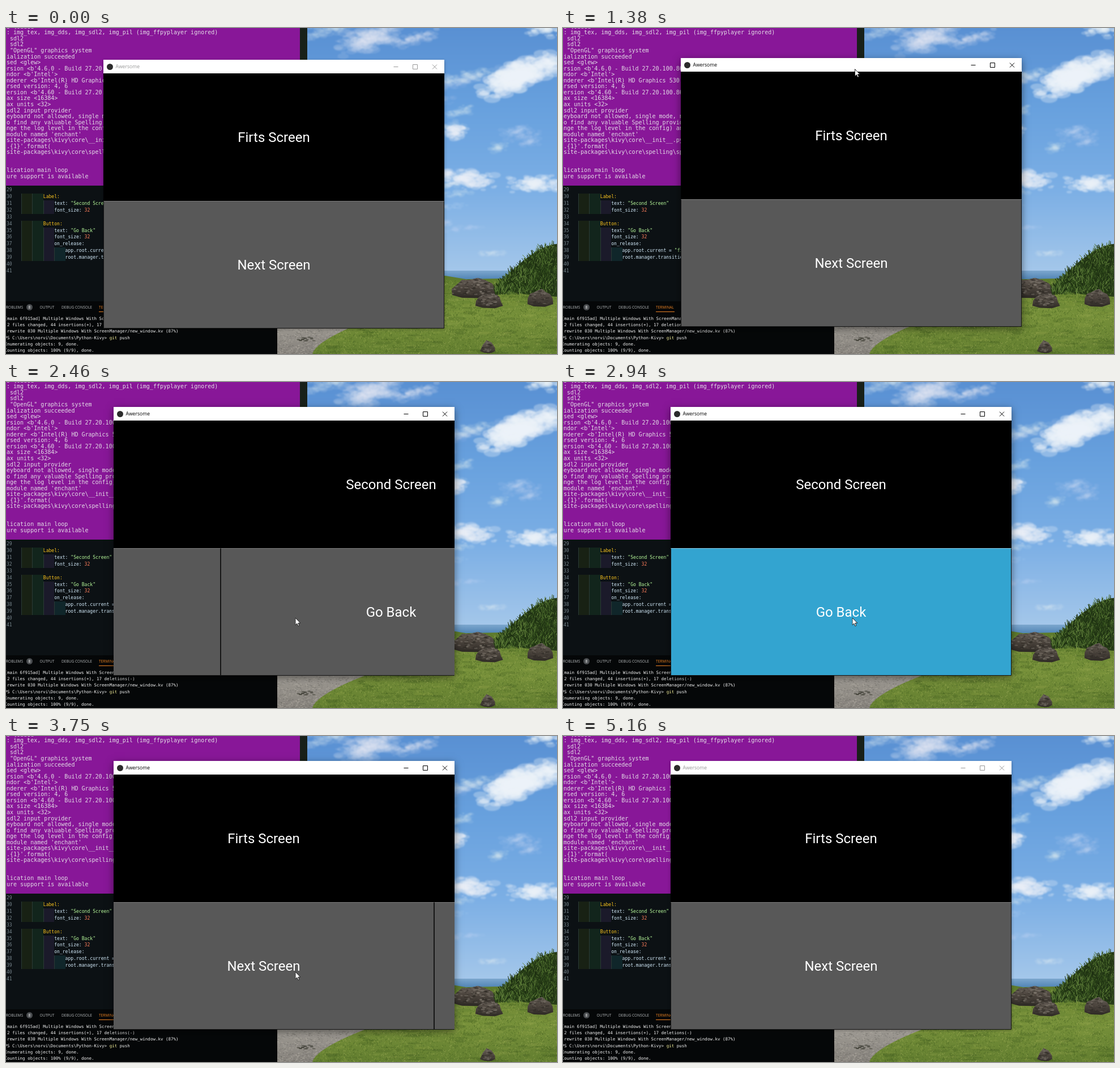
An HTML page with a canvas that plays this animation: 973 px wide and 575 px high, repeating every 5.25 s.

```html
<!DOCTYPE html>
<html lang="en">
<head>
<meta charset="utf-8">
<title>Two screens</title>
<style>
html, body { margin: 0; width: 100%; height: 100%; overflow: hidden; background: #0c1013; }
#stage { position: absolute; left: 0; top: 0; width: 973px; height: 575px; overflow: hidden; }
#stage div, canvas, svg { position: absolute; left: 0; top: 0; }
#stage .row { height: 12px; white-space: pre; }
.log { font: 10px/12px "DejaVu Sans Mono", monospace; color: #e3dde6; }
.code { font: 8.07px/12px "DejaVu Sans Mono", monospace; color: #d3ebfa; }
.shell { font: 7.5px/12px "DejaVu Sans Mono", monospace; color: #f2f2f2; }
.tab { font: 6.6px/12px "Open Sans", sans-serif; color: #b4b8ba; }
#win { width: 602px; height: 473px; background: #000; }
#stage #bar { top: -1px; width: 602px; height: 24px; background: #fff; }
#stage #icon { left: 6px; top: 6.5px; width: 11px; height: 11px; border-radius: 50%; background: #2b2b2b; }
#stage #title { left: 21.5px; top: 1px; font: 8.6px/23px "Open Sans", sans-serif; }
#stage #tools { top: 1px; fill: none; stroke: currentColor; }
#stage #view { top: 23px; width: 602px; height: 450px; overflow: hidden; background: #000; }
.screen { width: 602px; height: 450px; font: 24px "Roboto", sans-serif; color: #fff; text-align: center; }
.label { width: 602px; height: 225px; line-height: 226px; }
#stage .button { top: 225px; width: 600px; height: 223px; line-height: 225px;
  background: #585858; border: 1px solid #161616; border-top-color: #7b7b7b; }
#stage .button.down { background: #33a4d0; border-top-color: #86c9e2; }
</style>
</head>
<body>
<div id="stage">
  <canvas id="photo" width="973" height="575"></canvas>
  <div id="desk"></div>
  <div id="win">
    <div id="bar">
      <div id="icon"></div>
      <div id="title">Awersome</div>
      <svg id="tools" width="602" height="23">
        <path d="M512.5 11.5h8M546.5 7.5h8v8h-8zM581 7.5l8 8m0-8l-8 8"/>
      </svg>
    </div>
    <div id="view">
      <div class="screen" id="first"><div class="label">Firts Screen</div><div class="button">Next Screen</div></div>
      <div class="screen" id="second"><div class="label">Second Screen</div><div class="button">Go Back</div></div>
    </div>
  </div>
  <svg id="cursor" width="14" height="20">
    <path d="M.5.5v12.6l2.9-2.7 2 4.6 2-.9-2-4.4h3.9z" fill="#fff" stroke="#111" stroke-width=".9"/>
  </svg>
</div>
<script>
const $ = id => document.getElementById(id);
const desk = $('desk');

// ---------- wallpaper ----------
const photo = $('photo'), g = photo.getContext('2d');
let seed = 7;
function rnd() {
  seed = (seed + 0x6D2B79F5) | 0;
  let v = Math.imul(seed ^ (seed >>> 15), 1 | seed);
  v = (v + Math.imul(v ^ (v >>> 7), 61 | v)) ^ v;
  return ((v ^ (v >>> 14)) >>> 0) / 4294967296;
}
const range = (a, b) => a + (b - a) * rnd();
const spread = () => rnd() + rnd() - 1;
const pick = list => list[Math.floor(rnd() * list.length)];
const repeat = (n, fn) => { for (let i = 0; i < n; i++) fn(i); };

function ramp(y0, y1, ...colors) {
  const r = g.createLinearGradient(0, y0, 0, y1);
  colors.forEach((c, i) => r.addColorStop(i / (colors.length - 1), c));
  return r;
}
function poly(fill, points) {
  g.fillStyle = fill;
  g.beginPath();
  points.forEach(([x, y]) => g.lineTo(x, y));
  g.fill();
}
function blob(x, y, rx, ry, fill) {
  g.fillStyle = fill;
  g.beginPath();
  g.ellipse(x, y, rx, ry, 0, 0, 7);
  g.fill();
}
function blade(x, y, dx, dy, color) {
  g.strokeStyle = color;
  g.beginPath();
  g.moveTo(x, y);
  g.lineTo(x + dx, y + dy);
  g.stroke();
}
function cloud(cx, cy, rx, ry, alpha, tilt) {
  repeat(20 + rx * ry / 9, () => {
    const dx = spread() * rx, size = range(1, 2 + ry * 0.22);
    blob(cx + dx, cy + spread() * ry + dx * tilt, size * 2, size, `rgba(236,242,249,${alpha})`);
  });
}
// a lumpy half dome standing on cy
function rock(cx, cy, rx, ry) {
  const rim = [];
  for (let a = 0; a <= Math.PI * 1.01; a += Math.PI / 9) {
    const k = range(0.88, 1.08);
    rim.push([cx - Math.cos(a) * rx * k, cy - Math.sin(a) * ry * k]);
  }
  rim.push([cx + rx * 0.4, cy + ry * 0.18], [cx - rx * 0.5, cy + ry * 0.15]);
  g.save();
  poly(ramp(cy - ry, cy + 4, '#6d655d', '#4b443d', '#2e2a25'), rim);
  g.clip();
  repeat(rx * 4, () => blob(cx + spread() * rx, cy - rnd() * ry, range(1, 4), range(0.5, 1.5),
    pick(['#2c282388', '#8d867b66', '#4c443c88'])));
  g.restore();
}

function paintSky() {
  g.fillStyle = ramp(0, 430, '#5990d3', '#68a1de', '#7cafe5', '#a4c7ea');
  g.fillRect(479, 0, 494, 440);
  repeat(44, () => {
    const y = range(0, 415), near = 1 - y / 430;
    cloud(range(532, 973), y, range(15, 60), 4 + near * 9, range(0.05, 0.12), -0.3 * near);
  });
  cloud(640, 20, 60, 24, 0.12, -0.25);
  cloud(905, 84, 72, 30, 0.32, -0.35);
  cloud(950, 4, 34, 13, 0.25, 0);
  cloud(795, 184, 21, 14, 0.28, 0);
  cloud(820, 268, 52, 18, 0.28, 0.1);
  cloud(935, 275, 54, 15, 0.3, 0);
  g.filter = 'blur(1.2px)';
  g.drawImage(photo, 0, 0);
  g.filter = 'none';
  g.fillStyle = ramp(427, 444, '#7fa9cf', '#4f83b4');
  g.fillRect(479, 428, 494, 20);
}

function paintGround() {
  poly(ramp(440, 575, '#5d7a2c', '#76903a', '#637e30'),
    [[479, 436], [776, 437], [812, 443], [973, 440], [973, 575], [479, 575]]);
  repeat(260, () => blob(range(479, 973), range(452, 575), range(4, 22), range(1, 3.5),
    pick(['#3c571c38', '#a5b45a2b', '#2f481638', '#94a54830'])));
  g.lineWidth = 0.9;
  repeat(6500, () => blade(range(479, 973), range(446, 576), spread() * 3, -range(1, 3),
    pick(['#3f5a1f99', '#91a54a88', '#6c883199', '#a9b66088', '#4e6a2599'])));

  const edge = y => 541 + 100 * Math.pow((575 - y) / 60, 1.6);
  const path = [[479, 575], [479, 515]];
  for (let y = 515; y <= 575; y += 5) path.push([edge(y), y]);
  poly(ramp(515, 575, '#a09c95', '#85817b'), path);
  repeat(600, () => {
    const y = range(519, 575);
    blob(range(479, edge(y)), y, range(0.5, 2), 0.6, pick(['#6c686377', '#bdb8af66']));
  });
  repeat(16, () => blob(531 + spread() * 20, 549 + spread() * 4, 3, 1, '#3b3a32aa'));
}

function paintBush() {
  const crest = x => 374 + 81 * Math.pow(Math.max(0, 973 - x) / 111, 1.6);
  const outline = [[973, 474], [920, 470], [863, 460]];
  for (let x = 863; x <= 973; x += 5) outline.push([x, crest(x) + 7]);
  poly('#283d18', outline);
  g.lineWidth = 1;
  repeat(1300, () => {
    const x = range(864, 976), top = crest(x) + 9;
    blade(x, range(top, 471), spread() * 10, -range(3, 12),
      pick(['#1d3011', '#37541f', '#4a692c', '#66853e', '#243b14', '#1a2a10']));
  });
}

// ---------- desktop text ----------
function box(x, y, w, h, color) {
  const d = document.createElement('div');
  d.style.cssText = `left:${x}px;top:${y}px;width:${w}px;height:${h}px;background:${color}`;
  desk.append(d);
  return d;
}
// parts: plain strings or [string, color]
function row(kind, x, y, ...parts) {
  const d = document.createElement('div');
  d.className = 'row ' + kind;
  d.style.left = x + 'px';
  d.style.top = y - 6 + 'px';
  for (const part of parts) {
    const [text, color] = [].concat(part);
    const s = document.createElement('span');
    s.textContent = text;
    if (color) s.style.color = color;
    d.append(s);
  }
  desk.append(d);
}

// a leading ~ starts the line one column further left
const log = String.raw`s loaded
: img_tex, img_dds, img_sdl2, img_pil (img_ffpyplayer ignored)
 sdl2
 sdl2
 "OpenGL" graphics system
ialization succeeded
sed <glew>
~ersion <b'4.6.0 - Build 27.20.100.8681'>
~endor <b'Intel'>
~enderer <b'Intel(R) HD Graphics 530'>
~arsed version: 4, 6
~version <b'4.60 - Build 27.20.100.8681'>
ax size <16384>
ax units <32>
sdl2 input provider
eyboard not allowed, single mode, not docked
o find any valuable Spelling provider
~ange the log level in the config) and
module named 'enchant'
site-packages\kivy\core\__init__.py
.{1}'.format(
site-packages\kivy\core\spelling\sp


lication main loop
ure support is available`;

const code = `
  Label:
   text: "Second Screen"
   font_size: 32

  Button:
   text: "Go Back"
   font_size: 32
   on_release:
    app.root.current = "first"
    root.manager.transition.direction = "right"

`;

const shell = String.raw`[main 6f915ad] Multiple Windows With ScreenManager
 2 files changed, 44 insertions(+), 17 deletions(-)
 rewrite 030 Multiple Windows With ScreenManager/new_window.kv (87%)
PS C:\Users\norvi\Documents\Python-Kivy> git push
Enumerating objects: 9, done.
Counting objects: 100% (9/9), done.`;

function paint(token) {
  if (/^[A-Z]\w+:$/.test(token)) return [token, '#ffc81e'];
  if (token[0] === '"') return [token, '#b8fb9c'];
  if (/^\d+$/.test(token)) return [token, '#ff7f5c'];
  return token === 'git' ? [token, '#f5f09a'] : token;
}

function buildDesk() {
  box(0, 0, 532, 278, '#182019');
  box(0, 0, 519, 278, '#881798');
  box(0, 278, 479, 204, '#0c1114');
  box(0, 482, 479, 93, '#050708');

  log.split('\n').forEach((s, i) =>
    row('log', s[0] === '~' ? -5 : 1, -2.2 + i * 10.55, s.replace('~', '')));

  const indent = 19.4, tints = ['#182114', '#12251c', '#1b1a2a', '#10262a'];
  code.split('\n').forEach((s, i) => {
    const y = 286 + i * 11.92, depth = s.search(/\S/);
    tints.slice(0, Math.max(0, depth)).forEach((c, k) => {
      box(27 + k * indent, y - 6, indent, 12, c);
      box(27 + k * indent, y - 6, 1, 12, '#2b3a35');
    });
    row('code', 1, y, [String(29 + i), '#78868d']);
    row('code', 27 + depth * indent, y, ...s.trim().split(/(".*"|\b\d+$|^[A-Z]\w+:)/).map(paint));
  });

  row('tab', -4, 492.5, 'PROBLEMS');
  box(36, 487, 11, 11, '#4a4d50').style.borderRadius = '50%';
  row('tab', 39.6, 492.5, ['8', '#fff']);
  row('tab', 59.5, 492.5, 'OUTPUT');
  row('tab', 98, 492.5, 'DEBUG CONSOLE');
  row('tab', 164, 492.5, ['TERMINAL', '#ee8424']);
  box(164, 500, 33, 1, '#ee8424');

  shell.split('\n').forEach((s, i) =>
    row('shell', -2.5, 512.8 + i * 11.25, ...s.split(/\b(git)\b/).map(paint)));
}

// ---------- motion ----------
const LOOP = 5250, STEP = 30, WIDTH = 602, SLIDE = 383;
const FOCUS = 1140, BLUR = 5160, ENTER = 120;
const place = [[1200, 172, 57], [1380, 208, 54], [1560, 190, 45]];
const drag = place.map(([t, x, y]) => [t, x + 307, y + 18]);
const pointer = [
  [ENTER, 951, 25], [420, 580, 208], [600, 460, 368], [780, 451, 230], [FOCUS, 479, 75],
  ...drag,
  [2070, 507, 413], [2250, 510.5, 415.5], [4560, 510.5, 415.5], [4800, 796, 330]
];
// button down, button up, slide end; the two screens take turns
const clicks = [[2070, 2190, 2580], [2940, 3030, 3420], [3630, 3750, 4110], [4320, 4440, 4800]];
const screens = [$('first'), $('second')];

const clamp = v => Math.min(1, Math.max(0, v));
const move = (el, x, y) => { el.style.transform = `translate(${x}px,${y}px)`; };

function along(keys, t) {
  const i = keys.findIndex(k => t <= k[0]);
  if (i < 1) return keys.at(i).slice(1);
  const [a, ax, ay] = keys[i - 1], [b, bx, by] = keys[i];
  const p = (t - a) / (b - a);
  return [ax + (bx - ax) * p, ay + (by - ay) * p];
}

function draw(time) {
  const t = Math.floor((time % LOOP) / STEP) * STEP;
  const active = t >= FOCUS && t < BLUR;
  move($('win'), ...along(place, t).map(Math.round));
  $('win').style.boxShadow = active ? '0 3px 13px rgba(0,0,0,.5)' : '0 1px 5px rgba(0,0,0,.35)';
  $('bar').style.color = active ? '#000' : '#999';

  let shift = 0;
  const down = [false, false];
  clicks.forEach(([press, release, end], i) => {
    const side = i % 2;
    shift += (side ? -WIDTH : WIDTH) * clamp((t - end + SLIDE) / SLIDE);
    if (t >= press && t < release) down[side] = true;
  });
  screens.forEach((el, side) => {
    move(el, side * WIDTH - Math.round(shift), 0);
    el.lastElementChild.classList.toggle('down', down[side]);
  });

  move($('cursor'), ...along(pointer, t));
  $('cursor').style.visibility = t >= ENTER && t < BLUR ? 'visible' : 'hidden';
}

paintSky();
paintGround();
rock(826, 471, 42, 31);
rock(854, 490, 24, 24);
paintBush();
rock(943, 487, 22, 27);
rock(851, 570, 13, 19);
buildDesk();

const start = performance.now();
function tick() {
  draw(performance.now() - start);
  requestAnimationFrame(tick);
}
tick();
</script>
</body>
</html>
```
